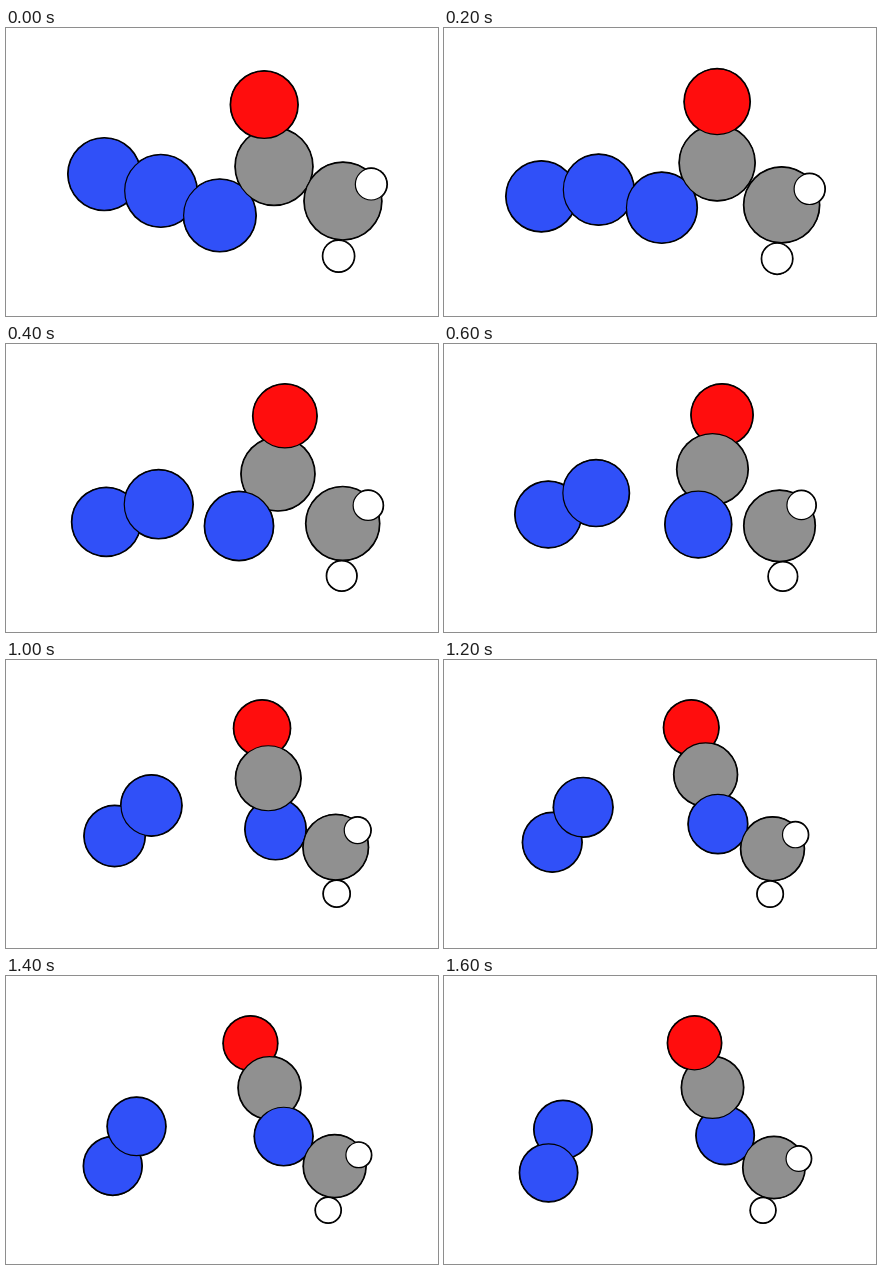
Recreate the animation shown at these times as an HTML page with a canvas. Size 432 px wide and 288 px high, loop 1800 ms.

```html
<!DOCTYPE html>
<html lang="en">
<head>
<meta charset="utf-8">
<title>Molecule</title>
<style>
html, body { margin: 0; height: 100%; overflow: hidden; background: #fff; }
canvas { display: block; }
</style>
</head>
<body>
<canvas id="stage" width="432" height="288"></canvas>
<script>
const STEP = 200, STEPS = 9, EDGE = 1.1;
const VIEW = { x: 221.5, y: 143.5, width: 321, height: 209 };
const KNOTS = [0, 1, 3, 6, 8];
const ctx = document.getElementById('stage').getContext('2d');

// Element colours and covalent radii in angstroms
const elements = {
  H: ['#ffffff', 0.31],
  C: ['#909090', 0.76],
  N: ['#3050f8', 0.71],
  O: ['#ff0d0d', 0.66]
};

// Cubic through the four knots nearest to t
function curve(values, t) {
  const first = t < 3 ? 0 : 1;
  const near = KNOTS.slice(first, first + 4);
  return near.reduce((sum, a, i) => sum + near.reduce(
    (w, b) => a === b ? w : w * (t - b) / (a - b), values[first + i]), 0);
}

const fixed = length => KNOTS.map(() => length);
const relax = (before, after) => KNOTS.map(k => k < 2 ? before : after);

// Each atom hangs on its parent by a bond of changing length and angle
const bond = (element, parent, length, angle, depth) =>
  ({ element, parent, length, angle, depth });

const atoms = {
  carbonyl: bond('C', null, fixed(0), fixed(0), t => 0),
  oxygen: bond('O', 'carbonyl', relax(1.23, 1.18), [-99, -90, -80, -107, -112],
    t => Math.abs(t - 5) - 2.5),
  nitrogen: bond('N', 'carbonyl', relax(1.435, 1.22), [138, 141, 104.4, 76, 75.3],
    t => Math.cos(1.5 * (t - 2.5))),
  methylene: bond('C', 'carbonyl', [1.515, 1.55, 1.88, 2.4, 2.48],
    [26.6, 33.1, 40.2, 48, 52.5], t => 2),
  hydrogenA: bond('H', 'methylene', fixed(0.645), [-30.8, -29.6, -43.4, -31.5, -19.5], t => 3),
  hydrogenB: bond('H', 'methylene', fixed(1.085), [94.5, 94.8, 86.2, 93, 104.3], t => 3),
  gasInner: bond('N', 'nitrogen', [1.254, 1.322, 2.29, 3.26, 3.988],
    [202.6, 196, 197, 187, 182.1], t => -2),
  gasOuter: bond('N', 'gasInner', relax(1.16, 1.12), [196.5, 173.3, 155.9, 131.5, 108.4],
    t => t - 9.5)
};

// Places all atoms, then scales and centres them in the view
function pose(t) {
  const placed = {};
  for (const [name, { element, parent, length, angle, depth }] of Object.entries(atoms)) {
    const from = placed[parent] || { x: 0, y: 0 };
    const turn = curve(angle, t) * Math.PI / 180;
    const reach = curve(length, t);
    const [color, r] = elements[element];
    placed[name] = {
      x: from.x + reach * Math.cos(turn),
      y: from.y + reach * Math.sin(turn),
      z: depth(t), color, r
    };
  }
  const discs = Object.values(placed).sort((a, b) => a.z - b.z);
  const low = axis => Math.min(...discs.map(d => d[axis] - d.r));
  const high = axis => Math.max(...discs.map(d => d[axis] + d.r));
  const [left, right, top, bottom] = [low('x'), high('x'), low('y'), high('y')];
  const zoom = Math.min((VIEW.width - 2 * EDGE) / (right - left),
                        (VIEW.height - 2 * EDGE) / (bottom - top));
  return discs.map(d => ({
    x: VIEW.x + (d.x - (left + right) / 2) * zoom,
    y: VIEW.y + (d.y - (top + bottom) / 2) * zoom,
    r: d.r * zoom,
    color: d.color
  }));
}

function disc(x, y, r, color) {
  ctx.beginPath();
  ctx.arc(x, y, r, 0, 2 * Math.PI);
  ctx.fillStyle = color;
  ctx.fill();
}

const poses = Array.from({ length: STEPS }, (_, t) => pose(t));

function draw(now) {
  const discs = poses[Math.floor(now / STEP) % STEPS];
  disc(VIEW.x, VIEW.y, 400, '#fff');
  // A black silhouette makes the outer rim heavier than the inner lines
  for (const { x, y, r } of discs) disc(x, y, r + EDGE, '#000');
  ctx.lineWidth = 1.2;
  for (const { x, y, r, color } of discs) {
    disc(x, y, r, color);
    ctx.stroke();
  }
}

const began = performance.now();
function loop() {
  draw(performance.now() - began);
  requestAnimationFrame(loop);
}
loop();
</script>
</body>
</html>
```
